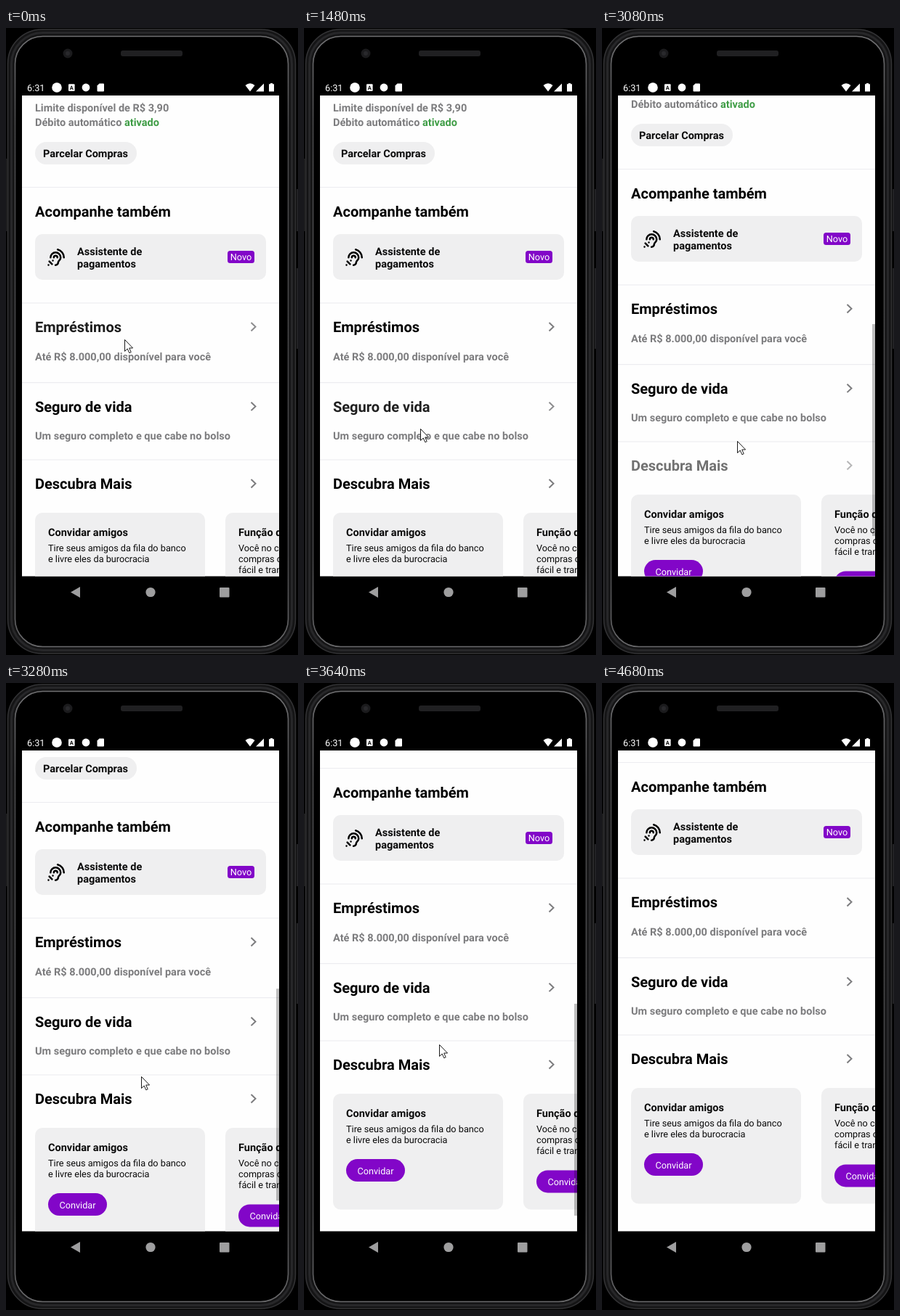
These frames come from a looping animation (402x864 px, 4920 ms). An HTML page:

```html
<!DOCTYPE html>
<html lang="pt-BR">
<head>
<meta charset="utf-8">
<title>App scroll</title>
<style>
html, body { margin: 0; width: 100%; height: 100%; overflow: hidden; background: #000; }
svg { display: block; width: 402px; height: 864px; }
text { font-family: Roboto, Arial, sans-serif; font-size: 12.7px; fill: #0a0a0a; text-rendering: geometricPrecision; }
.h { font-size: 20px; font-weight: 700; fill: #000; }
.b { font-size: 14.5px; font-weight: 700; }
.dim { fill: #7c7c7e; }
.on { fill: #3f9d46; }
.w { fill: #fff; }
.mid { text-anchor: middle; }
.card { fill: #efeff0; }
.buy { fill: #8206c8; }
.line { stroke: #ececf0; stroke-width: 1.2; }
.ink { fill: none; stroke: #000; stroke-width: 54; stroke-linecap: round; }
</style>
</head>
<body>
<svg viewBox="0 0 402 864">
  <defs>
    <clipPath id="view"><rect x="22" y="93" width="354" height="662.5"/></clipPath>
    <linearGradient id="rim" x1="0" y1="0" x2="0" y2="1">
      <stop offset="0" stop-color="#707072"/>
      <stop offset=".15" stop-color="#4a4a4c"/>
      <stop offset=".85" stop-color="#454547"/>
      <stop offset="1" stop-color="#6a6a6c"/>
    </linearGradient>
  </defs>

  <!-- phone body -->
  <rect width="402" height="864" fill="#000"/>
  <path d="M401 222v58M401 331v111M.5 180v100" stroke="#222224" stroke-width="2"/>
  <rect x="2.5" y="2" width="396" height="860" rx="47" fill="#151516" stroke="#343436" stroke-width="1.5"/>
  <rect x="7.5" y="6.5" width="386" height="851" rx="43" fill="none" stroke="#272729" stroke-width="3"/>
  <rect x="12.500" y="11.500" width="376" height="841" rx="38" fill="#000" stroke="url(#rim)" stroke-width="1.6"/>
  <circle cx="85" cy="35" r="6.500" fill="#1b1b1d"/>
  <circle cx="85" cy="35" r="3" fill="#29292c"/>
  <rect x="158" y="31" width="85" height="8" rx="3" fill="#202022"/>

  <!-- status bar -->
  <g fill="#fff">
    <text class="w" x="29" y="86.800">6:31</text>
    <circle cx="70" cy="82" r="6.800"/>
    <rect x="86" y="77.300" width="8.600" height="9.600" rx="1"/>
    <text class="mid" x="90.300" y="85" style="font-size:7.5px;font-weight:700">A</text>
    <circle cx="110" cy="82" r="5.400"/>
    <path d="M128.500 76.500h5.500q1 0 1 1v9q0 1-1 1h-7.500q-1 0-1-1v-7z"/>
    <path d="M329.500 79Q336 73.500 342.500 79L336 87.500z"/>
    <path d="M355 76.500v11h-11z"/>
    <path d="M364 76h3v1.200h2v10.300h-7v-10.300h2z"/>
  </g>

  <!-- app screen -->
  <g clip-path="url(#view)">
    <rect x="22" y="93" width="354" height="663" fill="#fefefe"/>
    <g id="page"></g>
    <rect id="bar" x="372" width="4" height="292"/>
  </g>

  <!-- navigation bar -->
  <g fill="#9e9e9f">
    <path d="M89 777.500L102 770v15z"/>
    <circle cx="199" cy="777.500" r="6.600"/>
    <rect x="294" y="771" width="13.500" height="13.500" rx="1"/>
  </g>

  <path id="cursor" d="M.5 .5V16.500L4.200 13L6.800 18.800L9.200 17.700L6.700 12H11.600z" fill="#fff" stroke="#1b1b1b"/>
</svg>
<script>
const LOOP = 4920, TICK = 40;
const $ = id => document.getElementById(id);

// Page parts
const text = (x, y, s, cls = '') => `<text x="${x}" y="${y}" class="${cls}">${s}</text>`;
const box = (x, y, w, h, r, cls) =>
  `<rect x="${x}" y="${y}" width="${w}" height="${h}" rx="${r}" class="${cls}"/>`;
const divider = y => `<path class="line" d="M22 ${y}h354"/>`;

const section = (id, y, title, note = '') => divider(y - 40) +
  `<g id="${id}">${text(40, y, title, 'h')}
   <path d="M337.500 ${y - 13}l6 5.700l-6 5.700" fill="none" stroke="#7d7d7f" stroke-width="2"/></g>` +
  text(40, y + 38.7, note, 'b dim');

function offer(x, title, lines) {
  const y = 721 + lines.length * 15.3;
  return box(x, 668, 234, 159.5, 10, 'card') + text(x + 18, 700, title, 'b') +
    lines.map((s, i) => text(x + 18, 721 + i * 15.2, s)).join('') +
    box(x + 18, y + 6.5, 81, 31, 15.5, 'buy') +
    text(x + 58.5, y + 27, 'Convidar', 'w mid');
}

const ear = `<g class="ink" transform="translate(57 304) scale(.047)">
  <path d="M92 260a148 148 0 0 1 296 0c0 86-72 86-72 144a80 80 0 0 1-80 80"/>
  <path d="M188 260a52 52 0 0 1 104 0M301 28a244 244 0 0 1 183 232"/>
  <path d="M160 352v1M32 480v1M56 376l80 80"/></g>`;

$('page').innerHTML =
  text(40, 115, 'Limite disponível de R$ 3,90', 'b dim') +
  text(40, 135, 'Débito automático <tspan class="on">ativado</tspan>', 'b dim') +
  box(40, 157, 140, 31, 15.5, 'card') +
  text(51, 178, 'Parcelar Compras', 'b') +
  divider(219.5) +
  text(40, 260, 'Acompanhe também', 'h') +
  box(40, 284, 318, 63, 10, 'card') + ear +
  text(98, 313, 'Assistente de', 'b') +
  text(98, 330, 'pagamentos', 'b') +
  box(305, 307, 37, 17, 3.5, 'buy') +
  text(323.5, 320.4, 'Novo', 'w mid') +
  section('loan', 419, 'Empréstimos', 'Até R$ 8.000,00 disponível para você') +
  section('life', 528.7, 'Seguro de vida', 'Um seguro completo e que cabe no bolso') +
  section('more', 635, 'Descubra Mais') +
  offer(40, 'Convidar amigos', ['Tire seus amigos da fila do banco', 'e livre eles da burocracia']) +
  offer(302, 'Função débito', ['Você no controle das', 'compras com um jeito', 'fácil e transparente']);

// Motion
const ramp = (t, a, b) => Math.min(1, Math.max(0, (t - a) / (b - a)));
const ease = (t, a, b) => { const u = ramp(t, a, b); return u * u * (3 - 2 * u); };
const press = (t, down, up) => .8 * (ramp(t, down, down + 150) - ramp(t, up, up + 250));

// Cursor moves: start, end, dx, dy
const moves = [
  [0, 200, 0, 19],
  [520, 900, -2, 72],
  [1120, 2120, -3, 108],
  [2680, 2900, 28, -36],
  [3860, 4240, 220, 0]
];

function draw(t) {
  const top = Math.round(110 * ease(t, 2749, 3816));
  let x = 163, y = 429 - .917 * top;
  for (const [a, b, dx, dy] of moves) {
    x += dx * ease(t, a, b);
    y += dy * ease(t, a, b);
  }
  $('cursor').setAttribute('transform', `translate(${Math.round(x)} ${Math.round(y)})`);
  $('page').setAttribute('transform', `translate(0 ${-top})`);
  $('bar').setAttribute('y', 397 + top * .441);
  $('bar').setAttribute('opacity', .25 * (ramp(t, 2720, 2800) - ramp(t, 4360, 4680)));
  $('loan').setAttribute('opacity', 1 - press(t, -400, -215));
  $('life').setAttribute('opacity', 1 - press(t, 1120, 1270));
  $('more').setAttribute('opacity', 1 - press(t, 1720, 1870) - press(t, 2720, 2970));
}

const start = performance.now();
function loop() {
  const t = (performance.now() - start) % LOOP;
  draw(Math.floor(t / TICK) * TICK);
  requestAnimationFrame(loop);
}
loop();
</script>
</body>
</html>
```
